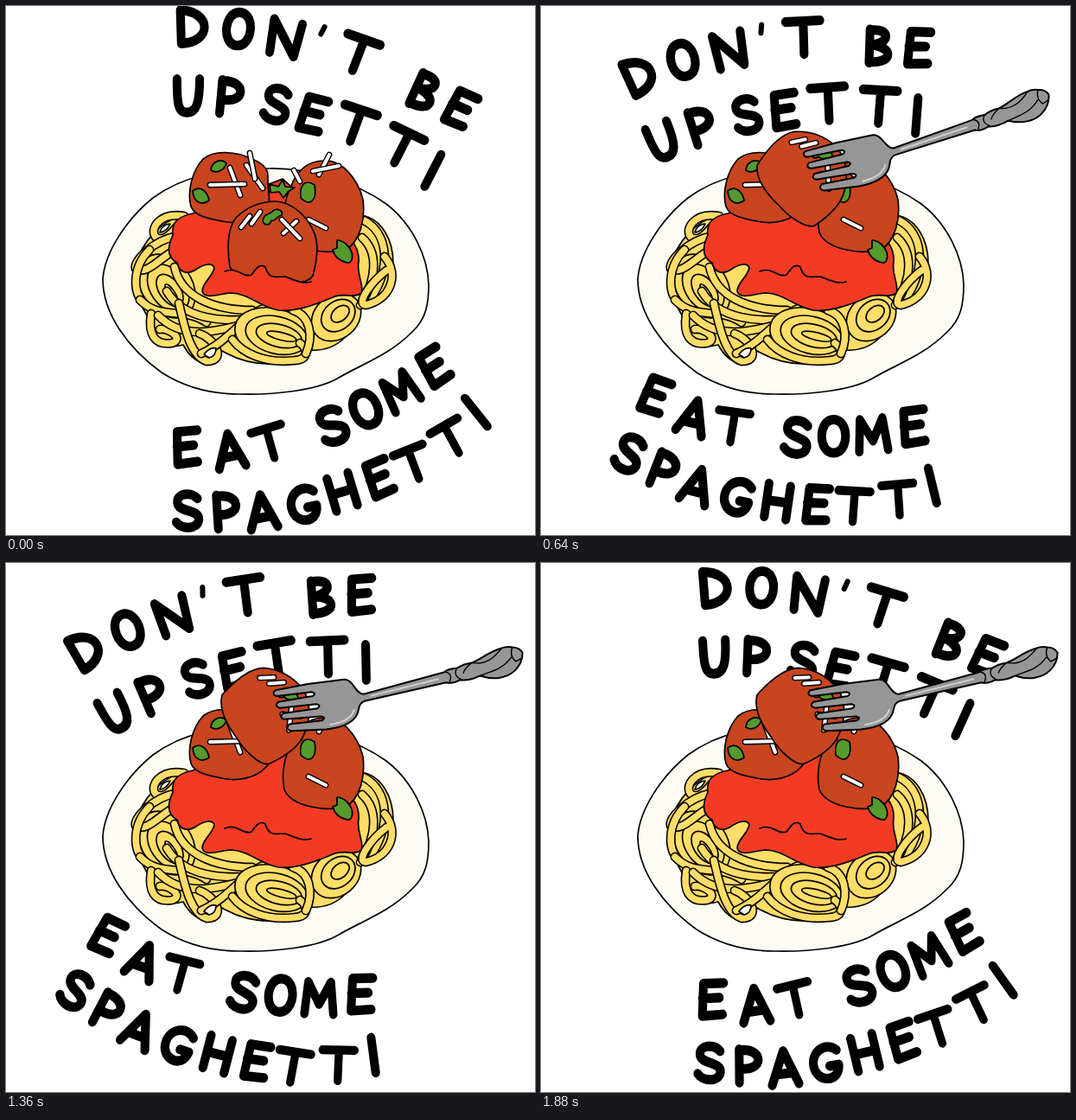
An HTML page that plays this animation: 612 px wide and 612 px high, repeating every 1920 ms.

```html
<!DOCTYPE html>
<html lang="en">
<head>
<meta charset="utf-8">
<title>Don't be upsetti</title>
<style>
  html, body { margin: 0; width: 100%; height: 100%; overflow: hidden; background: #fff; }
  svg { display: block; width: 100vw; height: 100vh; }
  path, ellipse, g { stroke-linecap: round; stroke-linejoin: round; }
  .lettering { fill: none; stroke: #000; stroke-width: 10.4; }
  .ink { stroke: #000; stroke-width: 1.7; }
  .line { fill: none; }
  .meat { fill: #c84520; }
  .sauce { fill: #f33b24; }
  .leaf { fill: #559b2c; }
  .pasta { fill: #ffdd67; }
  .plate { fill: #fdfcf4; }
</style>
</head>
<body>
<svg viewBox="0 0 612 612" role="img" aria-label="Don't be upsetti, eat some spaghetti">
  <g id="top" class="lettering"></g>
  <g id="bottom" class="lettering"></g>

  <path class="plate ink" d="M112 316C114 285 140 246 170 222C205 196 250 188 304 188C350 187 405 204 440 229C470 252 488 290 489 322C489 345 486 362 470 377C442 405 412 414 385 430C360 445 310 450 270 449C235 449 205 440 180 424C140 395 112 355 112 316Z"/>
  <g id="pasta"></g>

  <path class="sauce ink" d="M216 240C199 243 191 252 193 265C187 278 186 291 198 297C200 308 210 312 221 304C230 298 239 297 241 303C238 315 227 320 227 330C230 340 246 333 260 332C280 332 293 348 315 352C335 354 357 346 378 337C392 331 402 339 411 332C415 322 405 312 408 296C409 280 400 270 390 264L320 200Z"/>

  <path class="meat ink" d="M214 232C209 214 216 190 228 177C240 167 259 169 272 172C288 178 303 183 303 196C302 211 308 229 301 236C289 249 268 253 250 249C235 246 218 243 214 232Z"/>
  <path class="leaf ink" d="M237 190C238 179 250 176 255 182C252 191 243 194 237 190Z"/>
  <path class="leaf ink" d="M216 214C224 207 233 214 235 225C227 231 217 228 216 214Z"/>
  <g id="leftCheese"></g>

  <path class="meat ink" d="M322 262C318 242 322 225 330 208C337 190 350 179 368 179C389 178 407 200 413 224C416 248 409 273 393 282C370 288 330 282 322 262Z"/>
  <path class="leaf ink" d="M341 222C339 206 347 200 357 207C360 223 353 234 341 222Z"/>
  <path class="leaf ink" d="M305 206L315 209L320 201L323 209L334 210L326 215L321 222L316 215L306 216Z"/>
  <path class="leaf ink" d="M378 282L383 280L383 271C391 271 398 279 400 285C402 292 399 298 395 297C386 295 380 290 378 282Z"/>
  <g id="rightCheese"></g>

  <g id="ball">
    <path class="meat ink" d="M259 302C256 282 255 259 266 245C280 231 298 226 313 226C333 228 348 244 355 259C362 272 361 290 355 312C350 321 325 324 308 321C287 320 268 315 259 302Z"/>
    <path class="leaf ink" d="M297 248C300 238 305 243 310 236C315 234 321 237 319 242C313 242 313 250 307 248C305 255 298 254 297 248Z"/>
    <g id="ballCheese"></g>
  </g>
  <path class="sauce" d="M253 307C268 301 273 315 284 311C289 304 294 297 300 302C304 317 313 313 323 313C334 317 342 322 353 319L357 332L320 345L250 326Z"/>
  <path class="ink line" d="M253 307C268 301 273 315 284 311C289 304 294 297 300 302C304 317 313 313 323 313C334 317 342 322 353 319"/>

  <g id="fork">
    <path fill="#969696" stroke="#000" stroke-width="2" d="M10-4C1-6 2-25-8-26L-50-31L-88-33Q-94-30-88-26L-48-21Q-42-18-48-16L-88-19Q-94-16-88-12L-46-6Q-40-3-46-1L-86-5Q-92-1-86 2L-44 9Q-38 12-44 14L-82 9Q-88 13-82 17L-42 25C-14 29-4 21 0 12Q3 4 10 4L106 6Q113 10 122 7Q132 11 146 8C160 17 176 18 186 12Q197 6 200-6Q198-13 190-15Q184-18 178-17C162-17 152-10 140-9Q130-10 122-7Q112-9 106-6Z"/>
    <path class="line" stroke="#cfcfcf" stroke-width="2" d="M-36 21Q-12 23-5 11M18 0L98 0"/>
    <path fill="none" stroke="#000" stroke-width="1.4" d="M108-6Q116-2 110 6M122-7Q115 0 124 7M140-9Q130-4 128 0M140-9C156-2 168-9 178-17M146 8C158 6 172 8 186-4M190-15Q184-6 190 2L197 0"/>
  </g>
</svg>
<script>
const LOOP = 1920, STEP = 40, SWING = 960;
const el = id => document.getElementById(id);

function add(parent, tag, attrs) {
  const node = document.createElementNS("http://www.w3.org/2000/svg", tag);
  for (const key in attrs) node.setAttribute(key, attrs[key]);
  parent.append(node);
}

// Hand lettering: single-stroke glyphs centred on their own origin.
const glyphs = {
  D: "M-14-18L-12 18C25 16 24-17-14-18Z",
  O: "M0-18C-19-18-19 18 0 18S19-18 0-18Z",
  N: "M-15 18L-17-18L14 18L17-18",
  "'": "M1-7L-1 7",
  T: "M-20-18L21-17M1-17L-1 18",
  B: "M-11-18L-12 18M-11-17C14-20 14-3-10-1C17 0 18 19-12 17",
  E: "M13-18L-11-17L-12 18L12 16M-12-1L8-2",
  U: "M-14-18C-14 8-13 18-2 18S13 8 13-18",
  P: "M-11-18L-11 18M-11-17C18-20 20 6-10 3",
  S: "M12-13C4-21-13-19-12-9C-11 2 14-2 13 10C11 21-8 20-14 12",
  I: "M0-19L0 19",
  A: "M-16 18L0-18L16 18M-10 7L10 6",
  M: "M-18 18L-14-18L0 7L14-18L18 18",
  G: "M14-12C2-23-16-14-16 1C-16 20 12 24 14 4L3 4",
  H: "M-13-18L-13 18M13-18L13 18M-13 0L13 0"
};

// Each letter: glyph, x, y, tilt, optional scale.
function letter(parent, spec) {
  const [char, x, y, tilt, scale = 1] = spec.split(",");
  add(parent, "path", { d: glyphs[char], transform: `translate(${x} ${y}) rotate(${tilt}) scale(${scale * 0.97} ${scale * 1.07})` });
}

const topWords = "D,149,55,-13 O,202,44,-7 N,257,41,-3 ',297,22,6,.6 T,344,39,4 B,429,62,9 E,474,71,13 " +
  "U,165,133,-14 P,212,123,-9 S,266,118,-3,.97 E,310,119,3 T,361,119,3 T,419,131,10 I,460,148,13";
const bottomWords = "E,158,477,13 A,205,494,7 T,252,498,-3,.92 S,327,498,-4 O,369,490,-9 M,413,481,-14,.96 E,459,464,-14 " +
  "S,139,548,14 P,182,561,12 A,222,572,8 G,271,577,3 H,317,575,-1 E,363,571,-4 T,405,566,-8,.93 T,455,550,-16,.93 I,491,528,-23";
topWords.split(" ").forEach(spec => letter(el("top"), spec));
bottomWords.split(" ").forEach(spec => letter(el("bottom"), spec));

function outlined(parent, d, color, width, edge) {
  add(parent, "path", { d, class: "line", stroke: "#000", "stroke-width": width + edge });
  add(parent, "path", { d, class: "line", stroke: color, "stroke-width": width });
}
const cheese = (id, slivers) => slivers.forEach(d => outlined(el(id), d, "#fff", 4, 2.8));
cheese("leftCheese", ["M259 187L271 219", "M236 207L276 206", "M278 184L297 211", "M282 170L288 200"]);
cheese("rightCheese", ["M333 190L340 203", "M374 172L362 195", "M355 191L385 185", "M350 247L370 257"]);
cheese("ballCheese", ["M272 256L282 243", "M284 252L294 238", "M336 249L321 263", "M319 247L340 269"]);

const pasta = el("pasta");
const strand = d => outlined(pasta, d, "#ffdd67", 7.6, 3.2);

// A twirl of spaghetti: rings shrinking by one strand and drifting to one side.
function nest(x, y, rx, ry, tilt) {
  for (let shift = 0; rx > 4 && ry > 3; rx -= 9.5, ry -= 8.5, shift += 3)
    add(pasta, "ellipse", { cx: shift, rx, ry, class: "pasta ink", transform: `translate(${x} ${y}) rotate(${tilt})` });
}

add(pasta, "path", { class: "pasta ink", d: "M208 242C180 246 156 275 150 300C142 325 158 350 168 366C164 390 186 397 205 392C218 416 242 422 250 399C280 417 330 422 350 398C385 401 405 375 408 350C440 348 454 326 448 298C448 270 434 246 412 242Z" });
nest(186, 324, 40, 29, 55);
[
  "M206 243C176 238 165 260 174 268C186 274 196 256 204 248",
  "M198 266C168 272 147 296 150 304C164 312 178 290 200 280",
  "M166 282C146 302 146 332 160 344",
  "M155 340C178 364 205 348 232 366",
  "M168 356C164 380 172 393 192 390C206 386 190 372 178 374"
].forEach(strand);
nest(382, 360, 31, 25, -40);
[
  "M195 302C202 335 238 352 285 352",
  "M186 330C205 362 250 368 300 360",
  "M176 358C205 388 245 376 282 366",
  "M200 344C206 368 212 404 232 411C256 411 242 385 224 379",
  "M300 349C276 357 258 388 226 402"
].forEach(strand);
nest(310, 380, 46, 30, 14);
[
  "M262 386C274 402 300 414 334 410C350 409 350 397 340 390",
  "M332 352C352 358 356 382 347 402",
  "M414 248C442 262 448 304 418 344",
  "M412 268C430 284 430 314 410 346",
  "M438 290C456 312 444 340 416 346C404 344 424 318 440 306"
].forEach(strand);
["M178 262Q180 253 190 252Q186 261 178 262Z", "M229 403Q236 394 243 396Q243 405 235 407Z"]
  .forEach(d => add(pasta, "path", { d, class: "plate ink" }));

// Keys are [time, ...values], joined by straight motion.
const forkKeys = [[0, 710, -25, -39], [200, 443, 186, -39], [250, 377, 230, -38.5], [480, 391, 193, -25.7], [740, 405, 158, -14]];
const ballKeys = [[250, 0, 0, 0], [480, 2, -42, 25], [740, -5, -100, 50]];

function sample(keys, t) {
  if (t <= keys[0][0]) return keys[0].slice(1);
  const i = keys.findIndex(key => key[0] > t);
  if (i < 0) return keys.at(-1).slice(1);
  const a = keys[i - 1], b = keys[i], k = (t - a[0]) / (b[0] - a[0]);
  return a.slice(1).map((v, n) => v + (b[n + 1] - v) * k);
}

const place = (id, transform) => el(id).setAttribute("transform", transform);

function draw(t) {
  const phase = (t % SWING) / SWING;
  const swing = 1 - Math.abs(1 - 2 * phase);
  place("top", `rotate(${14.1 - 34 * swing} 306 306)`);
  place("bottom", `rotate(${-15.6 + 37.3 * swing} 306 306)`);

  const [fx, fy, fa] = sample(forkKeys, t);
  place("fork", `translate(${fx} ${fy}) rotate(${fa})`);
  const [bx, by, ba] = sample(ballKeys, t);
  place("ball", `translate(${bx} ${by}) rotate(${ba} 310 273)`);
}

const start = performance.now();
function tick() {
  const t = (performance.now() - start) % LOOP;
  draw(Math.floor(t / STEP) * STEP);
  requestAnimationFrame(tick);
}
draw(0);
requestAnimationFrame(tick);
</script>
</body>
</html>
```
